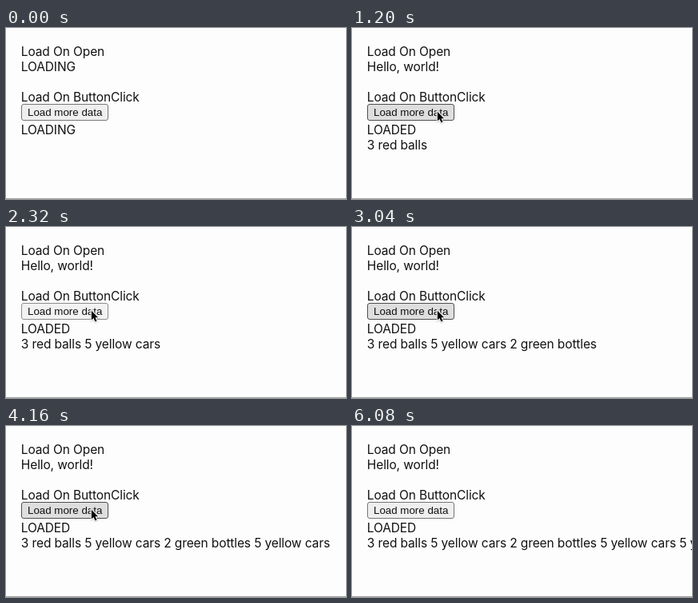
Recreate the animation shown at these times as an HTML page with a canvas. Size 425x214 px, loop 6.24 s.

```html
<!DOCTYPE html>
<html lang="en">
<head>
<meta charset="utf-8">
<title>Load more data</title>
<style>
  html, body { margin: 0; width: 100%; height: 100%; overflow: hidden; background: #fdfdfd; }
  canvas { display: block; width: 425px; height: 214px; }
</style>
</head>
<body>
<canvas id="stage"></canvas>
<script>
const W = 425, H = 214, LOOP = 6240;
const LEFT = 18.8;
const BODY_FONT = '15.5px Inter, sans-serif';
const BUTTON_FONT = '13.333px "Liberation Sans", Arial, sans-serif';
const BUTTON = { x: 19, y: 95, w: 109, h: 21 };
const COLORS = {
  idle: ['#efefef', '#767676'],
  hover: ['#dedede', '#4f4f4f'],
  active: ['#f2f2f2', '#8d8d8d'],
};

const HELLO_AT = 800;
const PRESS_TIME = 80;
const presses = [1360, 2320, 3360, 4400];
const arrivals = [
  [400, '3 red balls'],
  [2000, '5 yellow cars'],
  [3040, '2 green bottles'],
  [4000, '5 yellow cars'],
  [5040, '5 yellow cars'],
];

// Pointer poses: start time, x, y, shape
const pointer = [
  [0],
  [80, 265, 188, 'arrow'],
  [160, 161, 70, 'arrow'],
  [800, 128, 84, 'beam'],
  [880, 122, 91, 'beam'],
  [960, 115, 98, 'arrow'],
  [1040, 110, 101, 'arrow'],
  [1120, 107, 103, 'arrow'],
  [1200, 106, 104, 'arrow'],
  [5680, 160, 105, 'arrow'],
  [5760, 216, 106, 'arrow'],
  [6000, 230, 128, 'arrow'],
  [6080],
];

const canvas = document.getElementById('stage');
const ctx = canvas.getContext('2d');
const scale = window.devicePixelRatio || 1;
canvas.width = W * scale;
canvas.height = H * scale;

function text(str, x, baseline, font = BODY_FONT, spacing = '-0.115px') {
  ctx.font = font;
  ctx.letterSpacing = spacing;
  ctx.fillStyle = '#111';
  ctx.fillText(str, x, baseline);
}

function drawButton(state) {
  const { x, y, w, h } = BUTTON;
  const [fill, border] = COLORS[state];
  ctx.beginPath();
  ctx.roundRect(x + 0.5, y + 0.5, w - 1, h - 1, 2.5);
  ctx.fillStyle = fill;
  ctx.fill();
  ctx.strokeStyle = border;
  ctx.lineWidth = 1;
  ctx.stroke();
  text('Load more data', x + 8, y + 15, BUTTON_FONT, '0px');
}

function drawArrow() {
  const outline = [[0, 0], [0, 11.6], [2.6, 9.2], [4.7, 13.6], [6.7, 12.7], [4.7, 8.4], [8.3, 8.4]];
  ctx.beginPath();
  outline.forEach(([x, y]) => ctx.lineTo(x + 0.8, y + 0.8));
  ctx.closePath();
  ctx.strokeStyle = '#fff';
  ctx.lineWidth = 2;
  ctx.shadowColor = 'rgba(0,0,0,.3)';
  ctx.shadowBlur = 1.5 * scale;
  ctx.shadowOffsetY = 0.5 * scale;
  ctx.stroke();
  ctx.shadowColor = 'transparent';
  ctx.fillStyle = '#000';
  ctx.fill();
}

function drawBeam() {
  ctx.beginPath();
  for (const side of [-1, 1]) {
    ctx.moveTo(side * 3.5, -7.5);
    ctx.quadraticCurveTo(0, -7.5, 0, -5);
    ctx.lineTo(0, 5);
    ctx.quadraticCurveTo(0, 7.5, side * 3.5, 7.5);
  }
  ctx.moveTo(-2, 3);
  ctx.lineTo(2, 3);
  for (const [color, width] of [['#fff', 3], ['#111', 1.2]]) {
    ctx.strokeStyle = color;
    ctx.lineWidth = width;
    ctx.stroke();
  }
}

function drawPointer(x, y, shape) {
  if (!shape) return;
  ctx.save();
  ctx.translate(x, y);
  (shape === 'arrow' ? drawArrow : drawBeam)();
  ctx.restore();
}

function isOverButton(x, y) {
  const b = BUTTON;
  return x >= b.x && x < b.x + b.w && y >= b.y && y < b.y + b.h;
}

function draw(t) {
  const [, x, y, shape] = pointer.findLast(([start]) => start <= t);
  const pressed = presses.some(p => t >= p && t < p + PRESS_TIME);
  const requests = 1 + presses.filter(p => t >= p + PRESS_TIME).length;
  const items = arrivals.filter(([at]) => at <= t).map(([, item]) => item);

  ctx.setTransform(scale, 0, 0, scale, 0, 0);
  ctx.fillStyle = '#fdfdfd';
  ctx.fillRect(0, 0, W, H);
  ctx.fillStyle = '#a0a0a0';
  ctx.fillRect(0, H - 1, W, 1);

  text('Load On Open', LEFT, 35);
  text(t < HELLO_AT ? 'LOADING' : 'Hello, world!', LEFT, 54);
  text('Load On ButtonClick', LEFT, 92);
  drawButton(pressed ? 'active' : isOverButton(x, y) ? 'hover' : 'idle');
  text(items.length < requests ? 'LOADING' : 'LOADED', LEFT, 133);
  text(items.join(' '), LEFT, 152);
  drawPointer(x, y, shape);
}

const startTime = performance.now();
function tick() {
  draw((performance.now() - startTime) % LOOP);
  requestAnimationFrame(tick);
}
tick();
</script>
</body>
</html>
```
